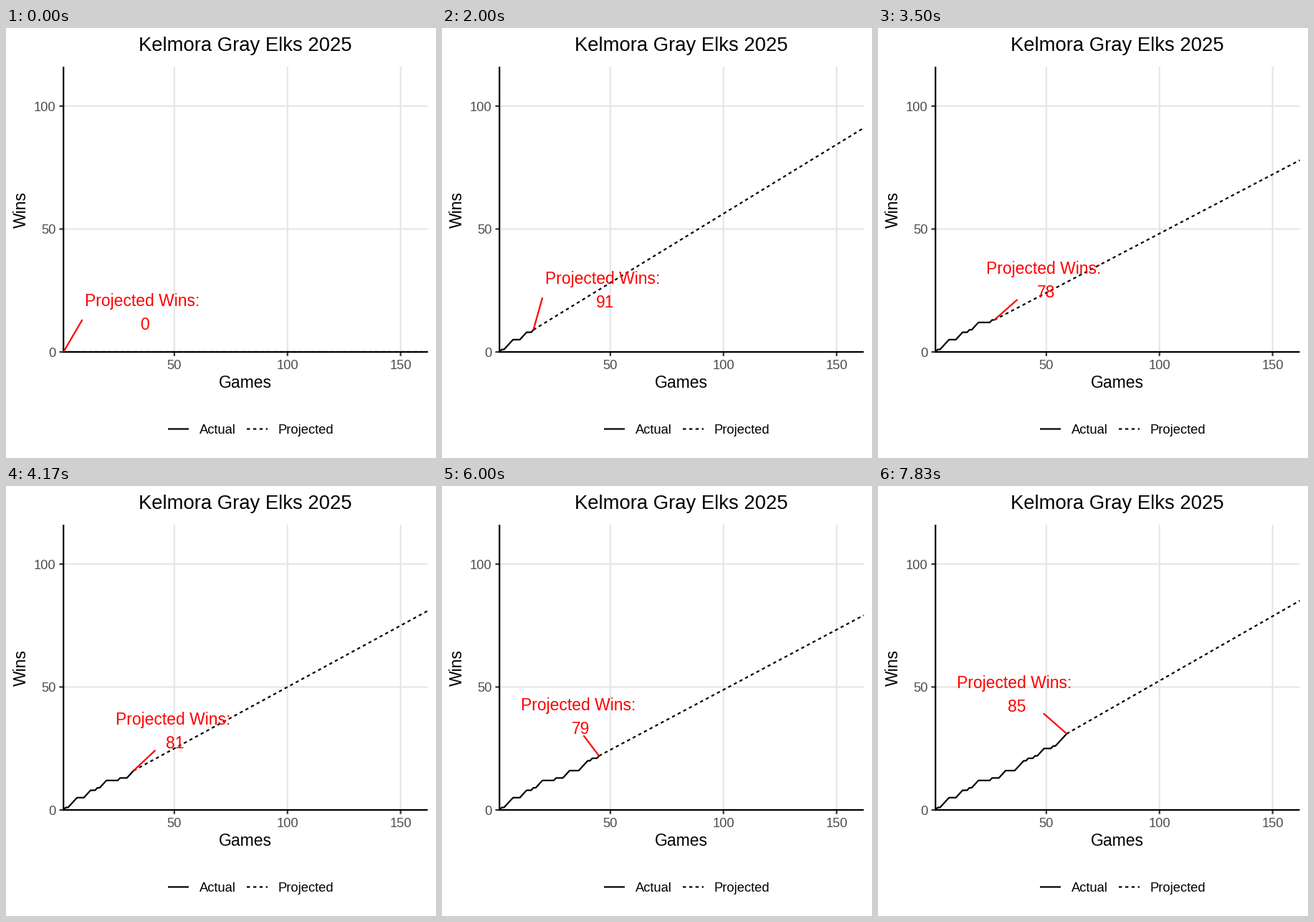
Write a matplotlib script that moves like this. It is 600 px wide and 600 px high and loops after 8000 ms.

```python
import math
import numpy as np
import matplotlib.pyplot as plt
from matplotlib.animation import FuncAnimation

SIZE, DPI = 600, 100
LOOP, TICK_MS = 8000, 25
STEPS_PER_TICK = 6 * TICK_MS / 1000      # the picture changes six times a second
GAMES_PER_STEP = 1.234
SNAP_BACK = 29                           # step at which the label jumps left
SEASON = 162
BASE = 22.92
SMALL = 0.8 * BASE
LW = 2.22
LEFT, RIGHT, TOP, BOTTOM = 80.2, 588.5, 54, 452
GRID, TICK, GREY = "#E6E6E6", "#333333", "#4D4D4D"
DASH = dict(linestyle=(0, (2, 2)))

# Lengths of alternating losing and winning streaks
STREAKS = [1, 1, 1, 4, 3, 3, 2, 1, 1, 3, 5, 1, 3,
           3, 4, 4, 1, 1, 2, 1, 1, 3, 3, 1, 1, 5]
results = np.repeat(np.arange(len(STREAKS)) % 2, STREAKS)
games = np.arange(1, len(results) + 1)
wins = np.cumsum(results)

plt.rcParams["font.family"] = "Liberation Sans"
fig = plt.figure(figsize=(SIZE / DPI, SIZE / DPI), dpi=DPI, facecolor="white")
ax = fig.add_axes([0, 0, 1, 1])
ax.set(xlim=(0, SIZE), ylim=(SIZE, 0))
ax.axis("off")


def pt(px):
    return px * 72 / DPI


def px_x(game):
    return LEFT + (game - 1) * (RIGHT - LEFT) / (SEASON - 1)


def px_y(won):
    return BOTTOM - 3.43 * won


def line(xs, ys, color="black", z=3, **style):
    return ax.plot(xs, ys, color=color, lw=pt(LW), zorder=z, snap=False,
                   solid_capstyle="butt", dash_capstyle="butt", **style)[0]


def label(x, y, text, size=BASE, color="black", ha="center", **style):
    return ax.text(x, y, text, fontsize=pt(size), color=color, ha=ha,
                   va="baseline", zorder=6, **style)


for g in (50, 100, 150):
    x = px_x(g)
    line([x, x], [TOP, BOTTOM], GRID, z=1)
    line([x, x], [BOTTOM, BOTTOM + 5.7], TICK, z=4)
    label(x, 476, str(g), SMALL, GREY)
for w in (0, 50, 100):
    y = px_y(w)
    line([LEFT, RIGHT], [y, y], GRID, z=1)
    line([LEFT - 5.7, LEFT], [y, y], TICK, z=4)
    label(69.5, y + 6.6, str(w), SMALL, GREY, ha="right")
line([LEFT, LEFT], [TOP, BOTTOM + LW / 2], z=5)
line([LEFT - LW / 2, RIGHT], [BOTTOM, BOTTOM], z=5)

label(334, 32, "Kelmora Gray Elks 2025", 1.2 * BASE)
label(334, 502, "Games")
label(28, 253.5, "Wins", rotation=90, rotation_mode="anchor")

for x, name, style in ((226, "Actual", {}), (336, "Projected", DASH)):
    line([x, x + 29], [559.5, 559.5], **style)
    label(x + 43.5, 566, name, SMALL, ha="left")

actual = line([], [])
projected = line([], [], **DASH)
leader = line([], [], "red", z=5.5)
caption = label(0, 0, "Projected Wins:", color="red")
count = label(0, 0, "", color="red")


def update(tick):
    step = int(tick * STEPS_PER_TICK + 0.11)
    n = round(1 + GAMES_PER_STEP * step)
    won = wins[n - 1]
    total = won / n * SEASON
    x, y = px_x(n), px_y(won)

    actual.set_data(px_x(games[:n]), px_y(wins[:n]))
    projected.set_data([x, RIGHT], [y, px_y(total)])

    # The label eases right, then snaps back to its left bound
    mid = 190.5
    if step < SNAP_BACK:
        mid += 45 * (1 - math.exp(-step / 8.7))
    caption.set_position((mid, y - 64))
    count.set_position((mid + 3.2, y - 31))
    count.set_text(f"{total:.0f}")

    # The leader meets the label's left side, or its underside once below it
    side = mid - 84
    if x < side + 4:
        end = side, y - 45
    else:
        end = x + 34 * math.tanh((mid - x) / 38), y - 28.5
    leader.set_data([x, end[0]], [y, end[1]])
    return actual, projected, leader, caption, count


anim = FuncAnimation(fig, update, frames=LOOP // TICK_MS, interval=TICK_MS,
                     repeat=True, repeat_delay=0, blit=False)
plt.show()
```
